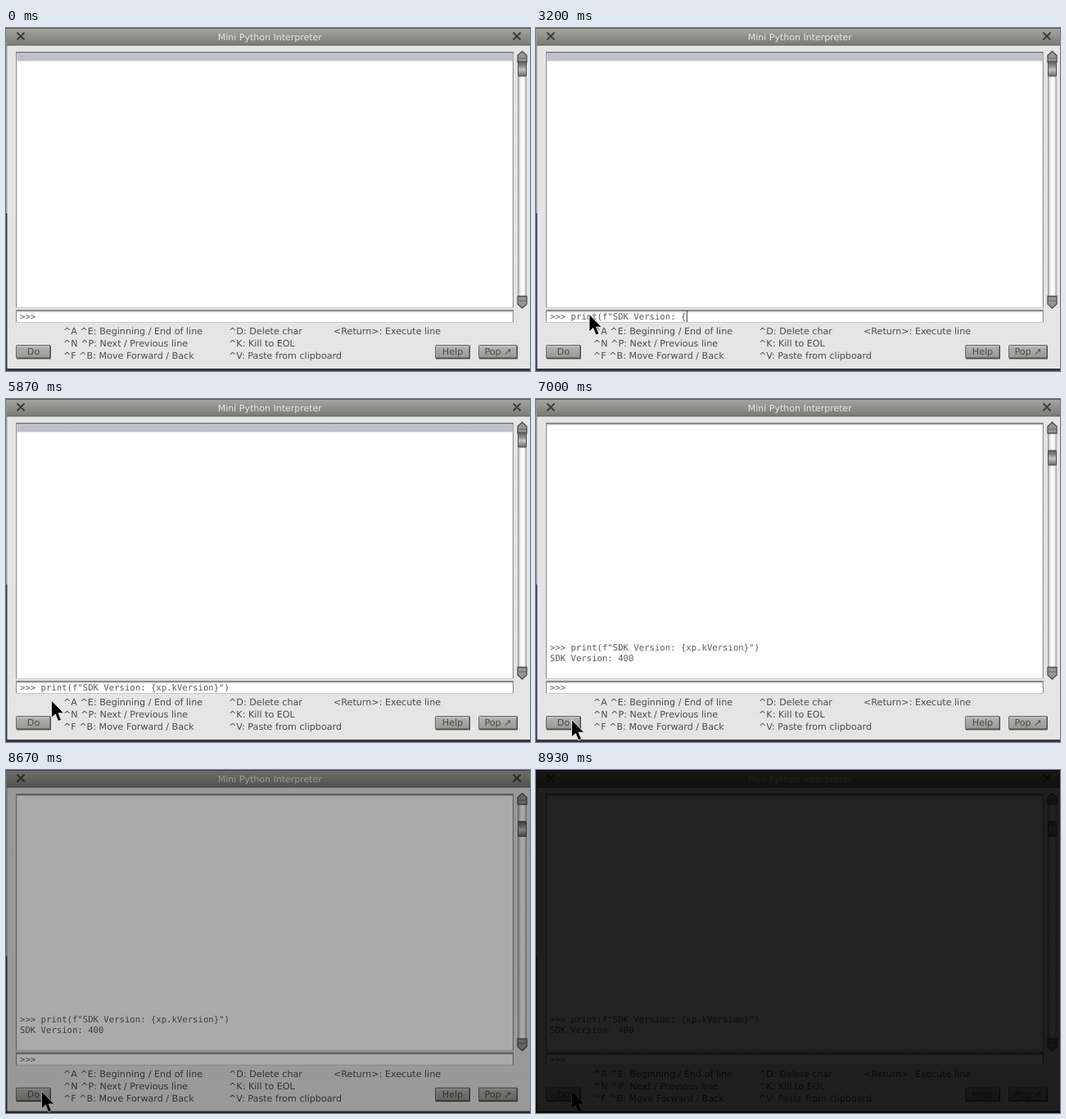
An HTML page for the animation above (9 s loop, 640 px wide and 420 px high).

```html
<!DOCTYPE html>
<html lang="en">
<head>
<meta charset="utf-8">
<title>Mini Python Interpreter</title>
<style>
  html, body { margin: 0; width: 100%; height: 100%; overflow: hidden; background: #000; }
  svg { display: block; width: 640px; height: 420px; }
  text { font: 11.15px "DejaVu Sans", sans-serif; fill: #4c4c4c; white-space: pre; text-rendering: geometricPrecision; }
  .mono { font: 10.63px "DejaVu Sans Mono", monospace; fill: #5a5a5a; }
  .title { font-size: 11px; fill: #e6e6e3; }
  .mid { text-anchor: middle; }
</style>
</head>
<body>
<svg viewBox="0 0 640 420">
  <defs>
    <linearGradient id="bar" x2="0" y2="1">
      <stop stop-color="#a4a59e"/><stop offset=".5" stop-color="#8e8f88"/><stop offset="1" stop-color="#7a7c73"/>
    </linearGradient>
    <linearGradient id="metal" x2="0" y2="1">
      <stop stop-color="#b4b4b1"/><stop offset="1" stop-color="#969693"/>
    </linearGradient>
    <linearGradient id="thumbFill" x2="0" y2="1">
      <stop stop-color="#5c5c5c"/><stop offset=".3" stop-color="#8a8a8a"/><stop offset=".55" stop-color="#c2c2c2"/><stop offset="1" stop-color="#6a6a6a"/>
    </linearGradient>
    <linearGradient id="track">
      <stop stop-color="#8c8c8c"/><stop offset=".25" stop-color="#e8e8e8"/><stop offset=".5" stop-color="#fff"/><stop offset=".75" stop-color="#f0f0f0"/><stop offset="1" stop-color="#9c9c9c"/>
    </linearGradient>
    <linearGradient id="inset" x2="0" y2="1">
      <stop stop-color="#6a6a6a"/><stop offset=".45" stop-color="#a8a8a8"/><stop offset="1" stop-color="#fff" stop-opacity="0"/>
    </linearGradient>
    <pattern id="lines" width="4" height="3" patternUnits="userSpaceOnUse">
      <path fill="#e6e6e6" d="M0 0h4v3H0z"/><path fill="#e2e2e2" d="M0 0h4v1H0z"/>
    </pattern>
  </defs>
  <g id="stage">
    <path fill="#343840" d="M0 0h640v420H0z"/>
    <path fill="#9a9b9b" d="M0 0h2v227H0z"/>
    <path fill="url(#lines)" d="M1.5 21H640v396H1.5z"/>
    <path fill="url(#bar)" d="M1 1h639v20H1z"/>
    <path fill="#5d5f57" d="M0 0h640v1H0zM1 20.5h639v1H1z"/>
    <path stroke="#3e3f39" stroke-width="2.1" fill="none" d="M13.500 5.500l9 9m0-9l-9 9M619.500 5.500l9 9m0-9l-9 9"/>
    <text class="title mid" x="322.300" y="15">Mini Python Interpreter</text>
    <g id="panels"></g>
    <path id="strip" fill="#bfc1ca" d="M13.500 31.500h606v9h-606z"/>
    <g id="output">
      <text class="mono" x="17" y="308" id="echo"></text>
      <text class="mono" x="17" y="321">SDK Version: 400</text>
    </g>
    <text class="mono" x="17" y="357" id="input"></text>
    <path id="caret" fill="#333" d="M0 346h1v14H0z"/>
    <rect x="625" y="41" width="11" height="288" fill="url(#track)"/>
    <g fill="#969694" stroke="#4d4d4b" stroke-width="1.300">
      <path d="M630.500 28.500l5.500 5v8.500h-11v-8.500z"/>
      <path d="M630.500 343l5.500-5v-9.500h-11v9.500z"/>
    </g>
    <path stroke="#666" d="M626 37h9M626 334h9"/>
    <g id="thumb">
      <rect x="625.500" y="-9" width="10" height="18" rx="1" fill="url(#thumbFill)" stroke="#4c4c4a"/>
    </g>
    <g id="labels"></g>
    <path id="pointer" fill="#000" stroke="#f4f4f4" stroke-width=".9" stroke-linejoin="round"
      d="M0 0V21.500L4.800 17 8.300 25.500 12 24 8.600 15.700H15.300Z"/>
  </g>
  <path id="shade" d="M0 0h640v420H0z"/>
</svg>
<script>
const LOOP = 9000, FPS = 15, CHAR = 6.4;
const COMMAND = 'print(f"SDK Version: {xp.kVersion}")';
const TYPE_START = 770, TYPE_STEP = 108, FOCUS = 600, RUN = 6660, FADE = 8500;
const $ = id => document.getElementById(id);
const clamp = x => Math.max(0, Math.min(1, x));
const ease = x => x * x * (3 - 2 * x);
const mix = (a, b, p) => a + (b - a) * p;

// Sunken white panel with a soft shadow at its top edge
const panel = (y, h) => `
  <rect x="12" y="${y}" width="608" height="${h}" fill="#fff"/>
  <rect x="12" y="${y}" width="608" height="4" fill="url(#inset)"/>
  <path fill="#929292" d="M12 ${y}h1.200v${h}h-1.200zM618.800 ${y}h1.200v${h}h-1.200z"/>
  <path fill="#c6c6c6" d="M12 ${y + h - 1}h608v1H12z"/>`;

const button = (x, w, label) => `
  <rect x="${x + .5}" y="388.500" width="${w - 1}" height="16" rx="1" fill="url(#metal)" stroke="#6a6a67"/>
  <path fill="#cacac7" d="M${x + 1.5} 389.500h${w - 3}v1h${3 - w}z"/>
  <path fill="#3f3f3d" opacity=".75" d="M${x + 1} 403.500h${w - 1}v2h${1 - w}zM${x + w - 1.5} 389h1.500v16h-1.500z"/>
  <text class="mid" x="${x + w / 2}" y="400">${label}</text>`;

const label = (x, row, s) => `<text x="${x}" y="${375 + 15 * row}">${s}</text>`;

$('panels').innerHTML = panel(29, 314) + panel(345, 16);
$('labels').innerHTML = [
  [70, ['^A ^E: Beginning / End of line', '^N ^P: Next / Previous line', '^F ^B: Move Forward / Back']],
  [272, ['^D: Delete char', '^K: Kill to EOL', '^V: Paste from clipboard']],
  [400, ['&lt;Return&gt;: Execute line']]
].map(([x, rows]) => rows.map((s, i) => label(x, i, s)).join('')).join('')
  + button(12, 43, 'Do') + button(524, 43, 'Help') + button(577, 48, 'Pop ↗');
$('echo').textContent = '>>> ' + COMMAND;

const show = (id, on) => $(id).setAttribute('visibility', on ? 'visible' : 'hidden');
const move = (id, x, y) => $(id).setAttribute('transform', `translate(${x} ${y})`);

function draw(t) {
  const done = t >= RUN;
  const count = done ? 0 : Math.max(0, Math.floor((t - TYPE_START) / TYPE_STEP));
  const typed = COMMAND.slice(0, count);
  $('input').textContent = '>>> ' + typed;

  show('caret', t >= FOCUS && !done && Math.floor(t / 500) % 2 === 0);
  move('caret', 43 + typed.length * CHAR, 0);
  show('strip', !done);
  show('output', done);
  move('thumb', 0, done ? 72 : 50);

  const enter = ease(clamp(t / 530));
  const leave = ease(clamp((t - 5530) / 730));
  move('pointer', mix(mix(-18, 65, enter), 43.5, leave), mix(350.5, 392.5, leave));

  const fade = clamp((t - FADE) / (LOOP - FADE));
  $('stage').setAttribute('transform', `scale(1 ${fade > 0 ? 1.002 : 1})`);
  $('shade').setAttribute('opacity', fade);
}

const start = performance.now();
function tick() {
  const t = (performance.now() - start) % LOOP;
  draw(Math.floor((t + 4) * FPS / 1000) * 1000 / FPS % LOOP);
  requestAnimationFrame(tick);
}
tick();
</script>
</body>
</html>
```
